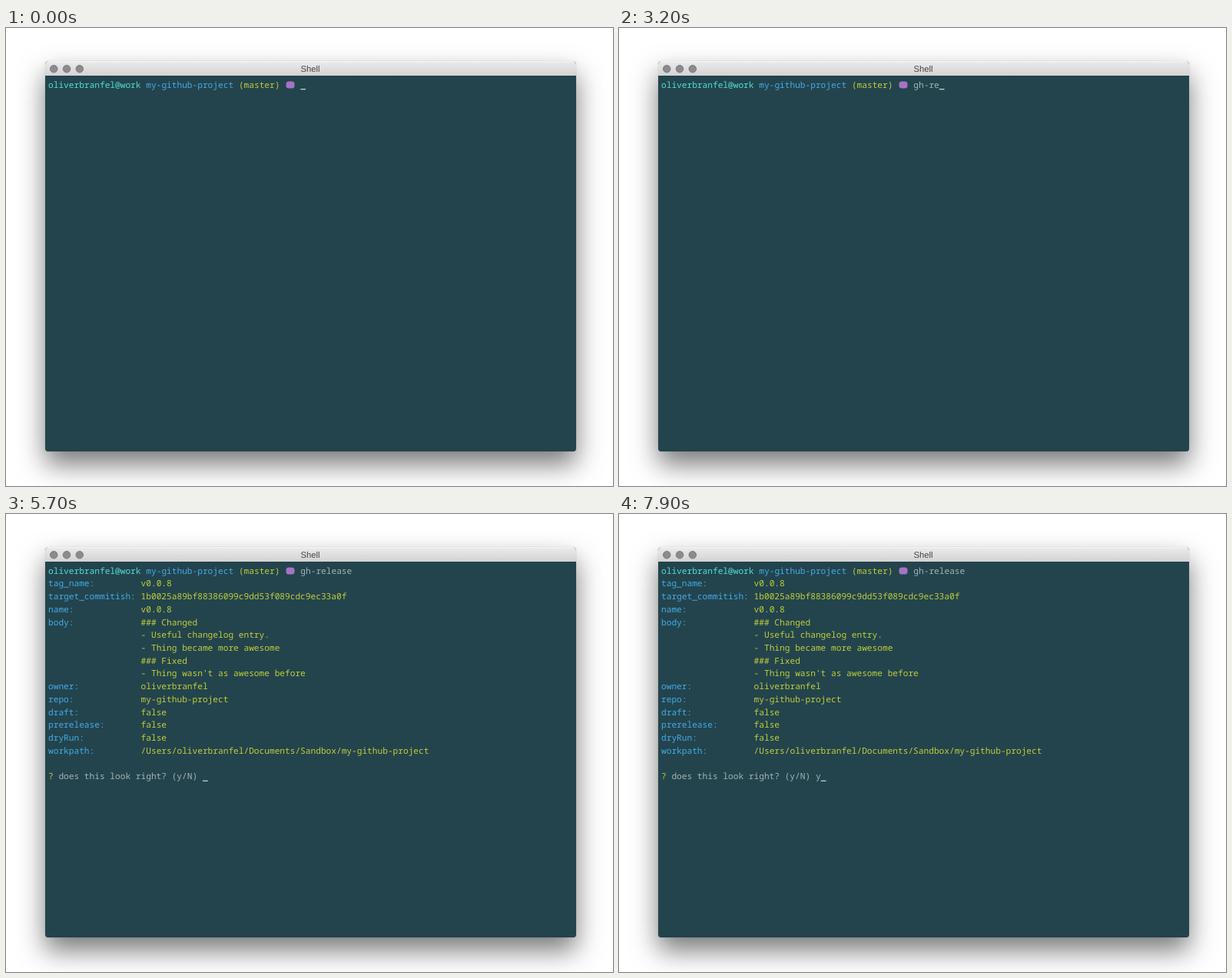
These frames come from a looping animation (790x596 px, 8 s). An HTML page:

```html
<!DOCTYPE html>
<html lang="en">
<head>
<meta charset="utf-8">
<title>Shell</title>
<style>
  html, body { margin: 0; width: 100%; height: 100%; overflow: hidden; background: #fff; }
  #window {
    position: absolute; left: 50.5px; top: 43px; width: 691.5px; height: 508px;
    border-radius: 5px 5px 4px 4px; background: #23444d;
    box-shadow: 0 17px 34px rgba(0, 0, 0, .53), 0 0 1px rgba(0, 0, 0, .35);
    overflow: hidden;
  }
  #bar { height: 19px; background: linear-gradient(#ececec, #d3d3d3); box-shadow: inset 0 1px #f5f5f5; }
  svg { position: absolute; left: 0; top: 0; }
  text { white-space: pre; text-rendering: geometricPrecision; }
  #term { font: 11.167px "Noto Sans Mono", "DejaVu Sans Mono", monospace; }
  #title { font: 11.2px "Liberation Sans", Arial, sans-serif; }
</style>
</head>
<body>
<div id="window"><div id="bar"></div></div>
<svg width="790" height="596" viewBox="0 0 790 596">
  <g fill="#8b8b8d" stroke="#727274" stroke-width=".8">
    <circle cx="62.2" cy="53.2" r="4.8"/>
    <circle cx="79" cy="53.2" r="4.8"/>
    <circle cx="95.8" cy="53.2" r="4.8"/>
  </g>
  <text id="title" x="396" y="57" text-anchor="middle" fill="#444">Shell</text>
  <g id="term">
    <g id="prompt"></g>
    <rect x="364.5" y="69.5" width="11" height="9" rx="3.5" fill="#a673c4"/>
    <g id="output"></g>
    <rect id="cursor" width="6.7" height="1.3" fill="#c3cfcf"/>
  </g>
</svg>
<script>
const LOOP = 8000, CHAR = 6.7, LINE = 16.73;
const CYAN = '#50dfd5', BLUE = '#43abe8', LIME = '#c0ce39', GRAY = '#a3b4b5';
const USER = 'oliverbranfel', REPO = 'my-github-project', COMMAND = 'gh-release';
const KEY_TIMES = [600, 700, 2400, 3100, 3200, 3300, 3500, 3600, 3700, 3900];
const ENTER = 4900, REPORT = 5700, ANSWER = 7700;
const COMMAND_COL = 49, ANSWER_COL = 30, VALUE_COL = 18;

const $ = id => document.getElementById(id);

function put(parent, col, row, string, color) {
  const el = document.createElementNS('http://www.w3.org/2000/svg', 'text');
  el.setAttribute('x', 55 + col * CHAR);
  el.setAttribute('y', 77.6 + row * LINE);
  el.setAttribute('fill', color);
  el.textContent = string;
  $(parent).append(el);
  return el;
}

put('prompt', 0, 0, USER + '@work', CYAN);
put('prompt', 19, 0, REPO, BLUE);
put('prompt', 37, 0, '(master)', LIME);
const command = put('prompt', COMMAND_COL, 0, '', GRAY);

[
  ['tag_name:', 'v0.0.8'],
  ['target_commitish:', '1b0025a89bf88386099c9dd53f089cdc9ec33a0f'],
  ['name:', 'v0.0.8'],
  ['body:', '### Changed'],
  ['', '- Useful changelog entry.'],
  ['', '- Thing became more awesome'],
  ['', '### Fixed'],
  ['', "- Thing wasn't as awesome before"],
  ['owner:', USER],
  ['repo:', REPO],
  ['draft:', 'false'],
  ['prerelease:', 'false'],
  ['dryRun:', 'false'],
  ['workpath:', `/Users/${USER}/Documents/Sandbox/${REPO}`]
].forEach(([key, value], i) => {
  put('output', 0, i + 1, key, BLUE);
  put('output', VALUE_COL, i + 1, value, LIME);
});
put('output', 0, 16, '?', LIME);
put('output', 2, 16, 'does this look right? (y/N)', GRAY);
const answer = put('output', ANSWER_COL, 16, '', GRAY);

function moveCursor(col, row) {
  $('cursor').setAttribute('x', 55 + col * CHAR);
  $('cursor').setAttribute('y', 79 + row * LINE);
}

function draw(now) {
  const t = now % LOOP;
  const typed = KEY_TIMES.filter(k => k <= t).length;
  const reply = t < ANSWER ? '' : 'y';
  command.textContent = COMMAND.slice(0, typed);
  answer.textContent = reply;
  $('output').style.display = t < REPORT ? 'none' : '';
  if (t < ENTER) moveCursor(COMMAND_COL + typed, 0);
  else if (t < REPORT) moveCursor(0, 1);
  else moveCursor(ANSWER_COL + reply.length, 16);
  requestAnimationFrame(draw);
}
draw(0);
</script>
</body>
</html>
```
